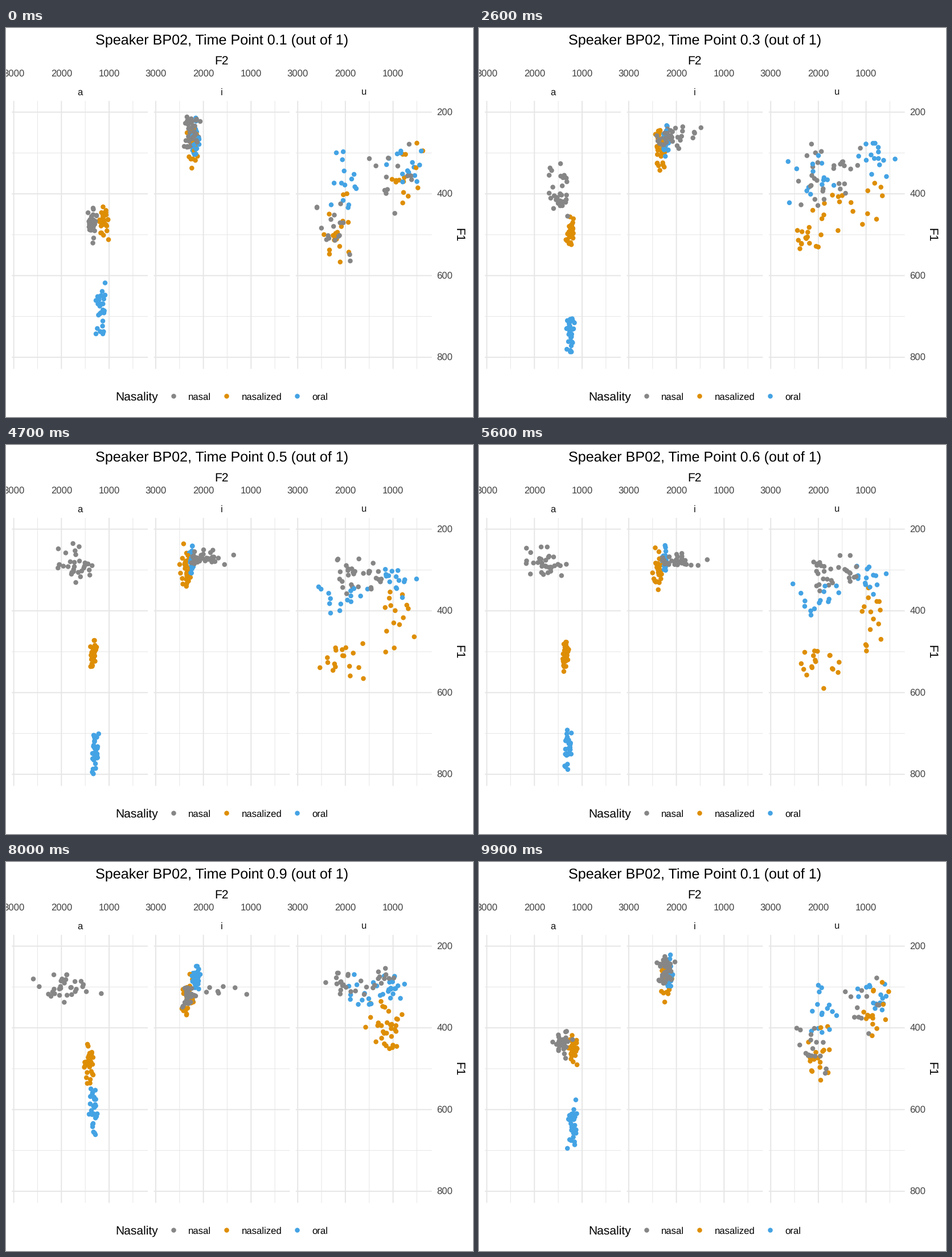
Animation, 820 px wide and 683 px high, one loop 10 s. Source, as a matplotlib script:

```python
import numpy as np
import matplotlib.pyplot as plt
from matplotlib.animation import FuncAnimation

W, H, DPI = 820, 683, 64
GREY, ORANGE, BLUE = "#868686", "#de8e05", "#44a3e4"
GRID, LABEL = "#e6e6e6", "#404040"
LAYER = {ORANGE: 0, BLUE: 0.25, GREY: 0.6}  # chance of lying on top
STATES = np.arange(1, 11)
HOLD, MOVE = 5, 5
DOT = 8.5

plt.rcParams["font.family"] = "Liberation Sans"
plt.rcParams["text.hinting"] = "none"

rng = np.random.default_rng(7)
tracks, colors, ranks = [], [], []


def cloud(color, n, keys):
    """Add n dots; keys maps a state to centre x, y and spread x, y."""
    params = np.array(list(keys.values()))
    cx, cy, sx, sy = (np.interp(STATES, list(keys), p) for p in params.T)
    shape = rng.standard_normal((n, 2))
    poses = []
    for i in range(len(STATES)):
        shape = 0.8 * shape + 0.6 * rng.standard_normal((n, 2))
        poses.append(np.clip(shape, -2, 2) * (sx[i], sy[i]) + (cx[i], cy[i]))
    tracks.append(poses)
    colors.extend([color] * n)
    ranks.extend(rng.random(n) + LAYER[color])


# vowel a
cloud(GREY, 31, {1: (153, 345, 5, 17), 2: (147, 337, 5, 20), 4: (142, 265, 14, 33),
                 5: (129, 214, 17, 22), 7: (111, 211, 18, 13), 9: (108, 230, 30, 16),
                 10: (125, 228, 30, 12)})
cloud(ORANGE, 31, {1: (172, 344, 4, 15), 4: (156, 366, 4, 14), 7: (149, 377, 4, 14),
                   9: (145, 356, 4, 18), 10: (138, 290, 8, 14)})
cloud(BLUE, 30, {1: (166, 491, 4, 23), 2: (163, 533, 4, 14), 5: (157, 544, 3, 18),
                 7: (156, 529, 3, 19), 9: (154, 432, 4, 27), 10: (156, 330, 6, 25)})

# vowel i, with a few wide-ranging nasal dots
cloud(GREY, 27, {1: (327, 186, 7, 19), 2: (315, 199, 8, 15), 4: (344, 191, 13, 10),
                 7: (348, 209, 14, 5), 9: (321, 233, 6, 11), 10: (328, 226, 20, 10)})
cloud(GREY, 8, {1: (327, 190, 8, 26), 4: (378, 189, 16, 9), 7: (358, 211, 22, 8),
                9: (385, 226, 38, 5), 10: (350, 222, 26, 9)})
cloud(ORANGE, 31, {1: (328, 206, 6, 20), 2: (319, 205, 6, 21), 7: (314, 219, 5, 22),
                   9: (320, 235, 6, 19), 10: (334, 222, 9, 12)})
cloud(BLUE, 30, {1: (333, 190, 3, 16), 5: (326, 198, 3, 15), 7: (326, 202, 3, 10),
                 9: (333, 203, 4, 10), 10: (343, 200, 9, 9)})

# vowel u: a front and a back cloud for each nasality
cloud(GREY, 18, {1: (576, 354, 15, 30), 2: (579, 312, 13, 46), 4: (592, 237, 13, 22),
                 7: (606, 230, 12, 13), 9: (595, 217, 17, 11), 10: (620, 225, 20, 12)})
cloud(GREY, 13, {1: (680, 268, 21, 32), 2: (641, 270, 14, 24), 5: (637, 227, 17, 18),
                 7: (649, 212, 9, 8), 9: (657, 206, 12, 10), 10: (660, 215, 20, 12)})
cloud(ORANGE, 18, {1: (577, 353, 15, 31), 4: (579, 361, 13, 23), 5: (584, 371, 20, 24),
                   7: (604, 383, 24, 25), 9: (664, 288, 18, 33),
                   10: (650, 270, 20, 18)})
cloud(ORANGE, 15, {1: (706, 262, 14, 34), 2: (694, 278, 20, 22), 4: (638, 326, 36, 26),
                   5: (688, 305, 17, 33), 7: (693, 302, 7, 33), 9: (674, 288, 10, 25),
                   10: (665, 270, 10, 18)})
cloud(BLUE, 15, {1: (593, 274, 11, 34), 2: (587, 262, 18, 25), 5: (587, 267, 29, 16),
                 7: (606, 265, 20, 19), 9: (638, 222, 27, 14)})
cloud(BLUE, 15, {1: (697, 250, 23, 17), 2: (700, 234, 21, 21), 5: (689, 244, 17, 13),
                 9: (680, 226, 11, 13), 10: (665, 222, 22, 12)})

order = np.argsort(ranks)
track = np.concatenate(tracks, axis=1)[:, order]
colors = np.array(colors)[order]

fig = plt.figure(figsize=(W / DPI, H / DPI), dpi=DPI, facecolor="white")
ax = fig.add_axes([0, 0, 1, 1])
ax.set(xlim=(0, W), ylim=(H, 0))
ax.axis("off")


def pt(px):
    return px * 72 / DPI


def label(x, y, text, size, color="black", ha="center", **kw):
    kw.setdefault("va", "baseline")
    return ax.text(x, y, text, fontsize=pt(size), color=color, ha=ha, **kw)


def grid(xs, ys, minor):
    ax.plot(xs, ys, color=GRID, lw=pt(1 if minor else 2), solid_capstyle="butt",
            snap=False, zorder=1 if minor else 2)


TOP, BOTTOM = 128, 598.5
for p, vowel in enumerate("aiu"):
    left = 10.2 + 249.3 * p
    right = left + 238.8
    for i in range(7):
        y = 147.7 + 71.75 * i
        grid([left, right], [y, y], i % 2)
    for i in range(6):
        x = left + 3.4 + 41.85 * i
        grid([x, x], [TOP, BOTTOM], i % 2)
        if i % 2 == 0:
            label(x, 86, str(3000 - 500 * i), 16.8, LABEL)
    label((left + right) / 2, 118, vowel, 16.8, "#111111")

for i in range(4):
    label(756.5, 153.7 + 143.5 * i, str(200 + 200 * i), 16.8, LABEL, "left")

label(378.5, 64, "F2", 21)
label(794.5, 363.5, "F1", 21, rotation=-90, va="center")
label(192, 654, "Nasality", 21, ha="left")
for x, name, color in [(293.5, "nasal", GREY), (387, "nasalized", ORANGE),
                       (511, "oral", BLUE)]:
    ax.scatter([x], [646.3], s=pt(DOT) ** 2, c=color, lw=0)
    label(x + 26.5, 652.5, name, 16.8, ha="left")

title = label(379, 28.5, "", 25.1)
dots = ax.scatter(*track[0].T, s=pt(DOT) ** 2, c=colors, lw=0, zorder=3)


def draw(frame):
    state, step = divmod(frame, HOLD + MOVE)
    after = (state + 1) % len(STATES)
    mix = max(0, step - HOLD) / MOVE
    dots.set_offsets(track[state] + (track[after] - track[state]) * mix)
    shown = STATES[after if mix > 0.5 else state]
    title.set_text(f"Speaker BP02, Time Point {shown / 10:g} (out of 1)")
    return dots, title


anim = FuncAnimation(fig, draw, frames=len(STATES) * (HOLD + MOVE), interval=100,
                     repeat=True)
plt.show()
```
